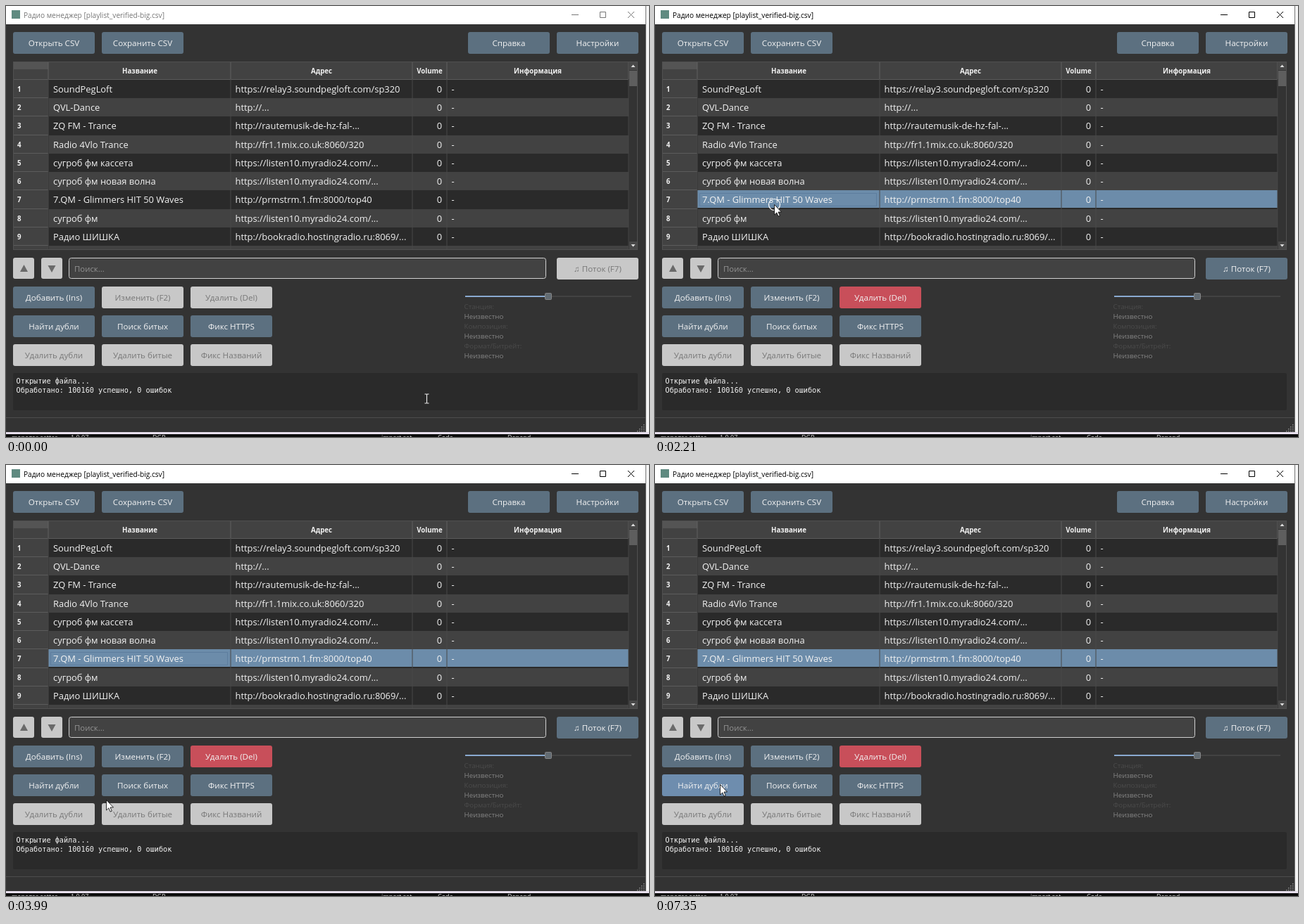
Write an HTML page that moves like this. It is 913 px wide and 613 px high and loops after 8000 ms.

```html
<!DOCTYPE html>
<html lang="ru">
<head>
<meta charset="utf-8">
<title>Радио менеджер</title>
<style>
html, body { margin: 0; width: 100%; height: 100%; overflow: hidden; background: #333; }
svg { display: block; width: 913px; height: 613px; font-family: "Open Sans", "Noto Sans", sans-serif; }
text { white-space: pre; fill: #f2f2f2; }
.mid { text-anchor: middle; }
.end { text-anchor: end; }
.cell { font-size: 12.9px; }
.bold { font-size: 9.7px; font-weight: 700; }
.log { font: 10.2px "DejaVu Sans Mono", monospace; }
.info { font-size: 9.75px; fill: #4b4b4b; }
.info.val { fill: #858585; }
.btn { font-size: 11.6px; }
.btn rect { fill: #5c7080; }
.btn.hover rect { fill: #6e8dae; }
.btn.down rect { fill: #53687b; }
.btn.off rect, .idle .pick rect { fill: #c8c8c8; }
.btn.off text, .idle .pick text { fill: #787878; }
.btn.red rect { fill: #c84f5a; }
.idle .btn.red rect { fill: #c8c8c8; }
.title { font-size: 10.15px; fill: #000; }
.ctl { fill: none; stroke: #000; }
.idle .title { fill: #777; }
.idle .ctl { stroke: #777; }
.idle .sel { visibility: hidden; }
.hint { font-size: 11.4px; fill: #929292; }
.under { font-size: 9px; fill: #ddd; }
</style>
</head>
<body>
<svg id="app" class="idle" viewBox="0 0 913 613"></svg>
<script>
const app = document.getElementById('app');
const rect = (x, y, w, h, fill, more = '') =>
  `<rect x="${x}" y="${y}" width="${w}" height="${h}" fill="${fill}" ${more}/>`;
const text = (x, y, s, cls = '') => `<text x="${x}" y="${y}" class="${cls}">${s}</text>`;
const path = (d, more) => `<path d="${d}" ${more}/>`;

const BTN_W = 116, BTN_H = 31;
const button = (x, y, label, cls = '') =>
  `<g class="btn ${cls}" data-x="${x}" data-y="${y}">` +
  rect(x, y, BTN_W, BTN_H, '', 'rx="3"') +
  text(x + BTN_W / 2, y + 20, label, 'mid') + '</g>';

function titleBar() {
  return rect(0, 0, 908, 26, '#fff') + rect(8, 6, 12, 12, '#5f8a80') +
    text(25, 17, 'Радио менеджер [playlist_verified-big.csv]', 'title') +
    path('M803 12.5h10M843.5 8.5h8v8h-8zM883 8l9 9M892 8l-9 9', 'class="ctl"');
}

function table() {
  const rows = [
    ['SoundPegLoft', 'https://relay3.soundpegloft.com/sp320'],
    ['QVL-Dance', 'http://...'],
    ['ZQ FM - Trance', 'http://rautemusik-de-hz-fal-...'],
    ['Radio 4Vlo Trance', 'http://fr1.1mix.co.uk:8060/320'],
    ['сугроб фм кассета', 'https://listen10.myradio24.com/...'],
    ['сугроб фм новая волна', 'https://listen10.myradio24.com/...'],
    ['7.QM - Glimmers HIT 50 Waves', 'http://prmstrm.1.fm:8000/top40'],
    ['сугроб фм', 'https://listen10.myradio24.com/...'],
    ['Радио ШИШКА', 'http://bookradio.hostingradio.ru:8069/...']
  ];
  const top = i => Math.round(105 + i * 26.25 - 0.1);
  let s = rect(10, 79, 887, 268, '#2a2a2a');
  for (let i = 0; i < 10; i++) {
    const y = top(i), h = Math.min(346, top(i + 1)) - y;
    s += rect(61, y, 823, h, i % 2 ? '#424242' : '#2a2a2a') + rect(11, y, 49, h, '#424242');
    if (i < 9) s += rect(11, y + h - 1, 49, 1, '#5c5c5c');
  }
  s += rect(60, 262, 824, 25, '#6c8caa', 'class="sel"');
  s += rect(11, 80, 873, 24, '#424242') + rect(11, 80, 49, 10, '#545454');
  s += rect(11, 104, 873, 1, '#5c5c5c');
  for (const x of [60, 319, 577, 626, 884]) {
    s += rect(x - 0.5, 80, 1, 24, '#606060') + rect(x - 0.5, 104, 1, 242, '#484848');
  }
  const heads = [[190, 'Название'], [448, 'Адрес'], [601.5, 'Volume'], [755, 'Информация']];
  for (const [x, label] of heads) s += text(x, 96, label, 'bold mid');
  rows.forEach(([name, url], i) => {
    const y = top(i) + 18;
    s += text(16, y - 1, i + 1, 'bold') + text(67, y, name, 'cell') + text(325.5, y, url, 'cell') +
      text(619, y, 0, 'cell end') + text(632.5, y, '-', 'cell');
  });
  s += '<g id="focus">' + rect(63.5, 266.5, 251, 18, 'none',
    'class="sel" stroke="#4f6f92" stroke-dasharray="1 1"') + '</g>';
  s += rect(885, 80, 11, 266, '#333') + rect(885, 80, 11, 11, '#484848') +
    rect(885, 92, 11, 22, '#5e5e5e') + rect(885, 335, 11, 11, '#484848') +
    path('M887.5 87h6l-3-3.5zM887.5 339h6l-3 3.5z', 'fill="#ddd"');
  return s + rect(10.5, 79.5, 886, 267, 'none', 'stroke="#505050"');
}

function controls() {
  let s = button(10, 37, 'Открыть CSV') + button(136, 37, 'Сохранить CSV') +
    button(656, 37, 'Справка') + button(782, 37, 'Настройки');
  for (const x of [10, 50]) s += rect(x, 358, 30, 30, '#c8c8c8', 'rx="3"');
  s += path('M20 378h11l-5.5-10zM59.5 369h11l-5.5 10z', 'fill="#6a6a6a"');
  s += rect(89.5, 358.5, 677, 29, '#424242', 'rx="3" stroke="#d0d0d0"') + text(97, 378, 'Поиск...', 'hint');
  s += button(782, 358, '♫ Поток (F7)', 'pick');
  const grid = [
    ['Добавить (Ins)', ''], ['Изменить (F2)', 'pick'], ['Удалить (Del)', 'pick red'],
    ['Найти дубли', 'find'], ['Поиск битых', ''], ['Фикс HTTPS', ''],
    ['Удалить дубли', 'off'], ['Удалить битые', 'off'], ['Фикс Названий', 'off']
  ];
  grid.forEach(([label, cls], i) => {
    s += button(10 + i % 3 * 126, 399 + Math.floor(i / 3) * 41, label, cls);
  });
  return s;
}

function player() {
  let s = rect(652, 412, 118, 2, '#8aaad0') + rect(770, 412.5, 118, 1, '#555') +
    rect(765.5, 408.5, 9, 9, '#626b72', 'rx="1" stroke="#858585"');
  ['Станция:', 'Композиция:', 'Формат/Битрейт:'].forEach((label, i) => {
    s += text(650.5, 431 + i * 28, label, 'info') + text(650.5, 445 + i * 28, 'Неизвестно', 'info val');
  });
  return s;
}

function footer() {
  let s = rect(10, 522, 887, 53, '#2a2a2a', 'rx="2"') + text(14.5, 537, 'Открытие файла...', 'log') +
    text(14.5, 550, 'Обработано: 100160 успешно, 0 ошибок', 'log') + rect(0, 585, 908, 1, '#4c4c4c');
  for (let r = 0; r < 4; r++)
    for (let c = 0; c <= r; c++) s += rect(905 - c * 3, 595 + r * 3, 1.5, 1.5, '#8a8a8a');
  s += rect(908, 0, 5, 606, '#f4f4f4') + rect(908, 0, 1, 606, '#777');
  s += rect(0, 606, 913, 3, '#e8e0ee') + rect(0, 609, 913, 4, '#0c0c0c');
  const bits = [[8, 'manager-setter'], [92, '1.0.07'], [208, 'DGR'], [533, 'import set'], [613, 'Code'], [712, 'Depend']];
  return s + '<g clip-path="url(#low)">' + bits.map(([x, w]) => text(x, 617, w, 'under')).join('') + '</g>';
}

app.innerHTML = '<clipPath id="low"><rect y="609" width="913" height="4"/></clipPath>' +
  rect(0, 0, 913, 613, '#333') + titleBar() + table() + controls() + player() + footer() +
  '<circle id="ring" r="8" fill="none" stroke="#fff" stroke-width="1.2"/>' +
  path('M0 0V14.5L3.3 11.4L5.6 16.6L7.8 15.6L5.5 10.5H10Z',
    'id="arrow" fill="#fff" stroke="#000" stroke-width=".8" stroke-linejoin="round"') +
  path('M-3-6.5H-.8L0-6L.8-6.5H3M0-6V6M-3 6.5H-.8L0 6L.8 6.5H3',
    'id="beam" fill="none" stroke="#eee" stroke-width="1.1"');

const el = id => document.getElementById(id);
const ring = el('ring'), arrow = el('arrow'), beam = el('beam'), focusBox = el('focus');
const buttons = [...app.querySelectorAll('.btn:not(.off)')];
const find = app.querySelector('.find');

// pointer glides: time, x, y
const track = [
  [0, 597, 558], [740, 597, 558], [860, 572, 540], [1020, 480, 472], [1180, 352, 384],
  [1330, 244, 322], [1450, 200, 292], [1520, 191, 284], [1580, 181, 293], [1640, 170, 300],
  [1730, 170, 300], [1880, 171, 290], [2010, 169, 282], [3130, 169, 282], [3240, 172, 306],
  [3400, 179, 376], [3540, 185, 445], [3660, 186, 470], [3720, 182, 481], [3790, 167, 484],
  [3900, 150, 478], [3960, 146, 477], [3990, 142, 476]
];
const trip = [[5190, 147, 473], [5330, 145, 467], [5500, 131, 462], [5680, 110, 457], [5880, 96, 454]];
// single-pixel nudges that jump
const nudges = [[4420, 144, 474], [4480, 145, 473], [4660, 147, 473]];
const drift = [[6710, 95, 454], [6830, 94, 454], [7040, 93, 454], [7350, 92, 454]];

function glide(keys, t) {
  const i = keys.findIndex(k => k[0] > t);
  if (i < 0) return keys[keys.length - 1].slice(1);
  const [t0, x0, y0] = keys[i - 1], [t1, x1, y1] = keys[i], f = (t - t0) / (t1 - t0);
  return [Math.round(x0 + (x1 - x0) * f), Math.round(y0 + (y1 - y0) * f)];
}
const jump = (keys, t) => keys.filter(k => k[0] <= t).pop().slice(1);

function pointer(t) {
  if (t >= drift[0][0]) return jump(drift, t);
  if (t >= trip[0][0]) return glide(trip, t);
  return t >= nudges[0][0] ? jump(nudges, t) : glide(track, t);
}
const inside = (x, y, l, t, r, b) => x >= l && x < r && y >= t && y < b;
const show = (node, on) => { node.style.display = on ? '' : 'none'; };

function draw(t) {
  const [x, y] = pointer(t);
  const idle = t < 2120, press = t >= 6000 && t < 6180;
  const typing = inside(x, y, 89, 358, 768, 388) || inside(x, y, 10, 522, 897, 575);
  const place = `translate(${x + 0.5} ${y + 0.5})`;
  app.classList.toggle('idle', idle);
  for (const b of buttons) {
    const bx = +b.dataset.x, by = +b.dataset.y;
    b.classList.toggle('hover', inside(x, y, bx, by, bx + BTN_W, by + BTN_H));
  }
  find.classList.toggle('down', press);
  show(focusBox, t < 6000);
  show(ring, (!idle && t < 2450) || press);
  show(arrow, !typing);
  show(beam, typing);
  for (const node of [ring, arrow, beam]) node.setAttribute('transform', place);
}

const start = performance.now();
function tick() {
  draw((performance.now() - start) % 8000);
  requestAnimationFrame(tick);
}
tick();
</script>
</body>
</html>
```
